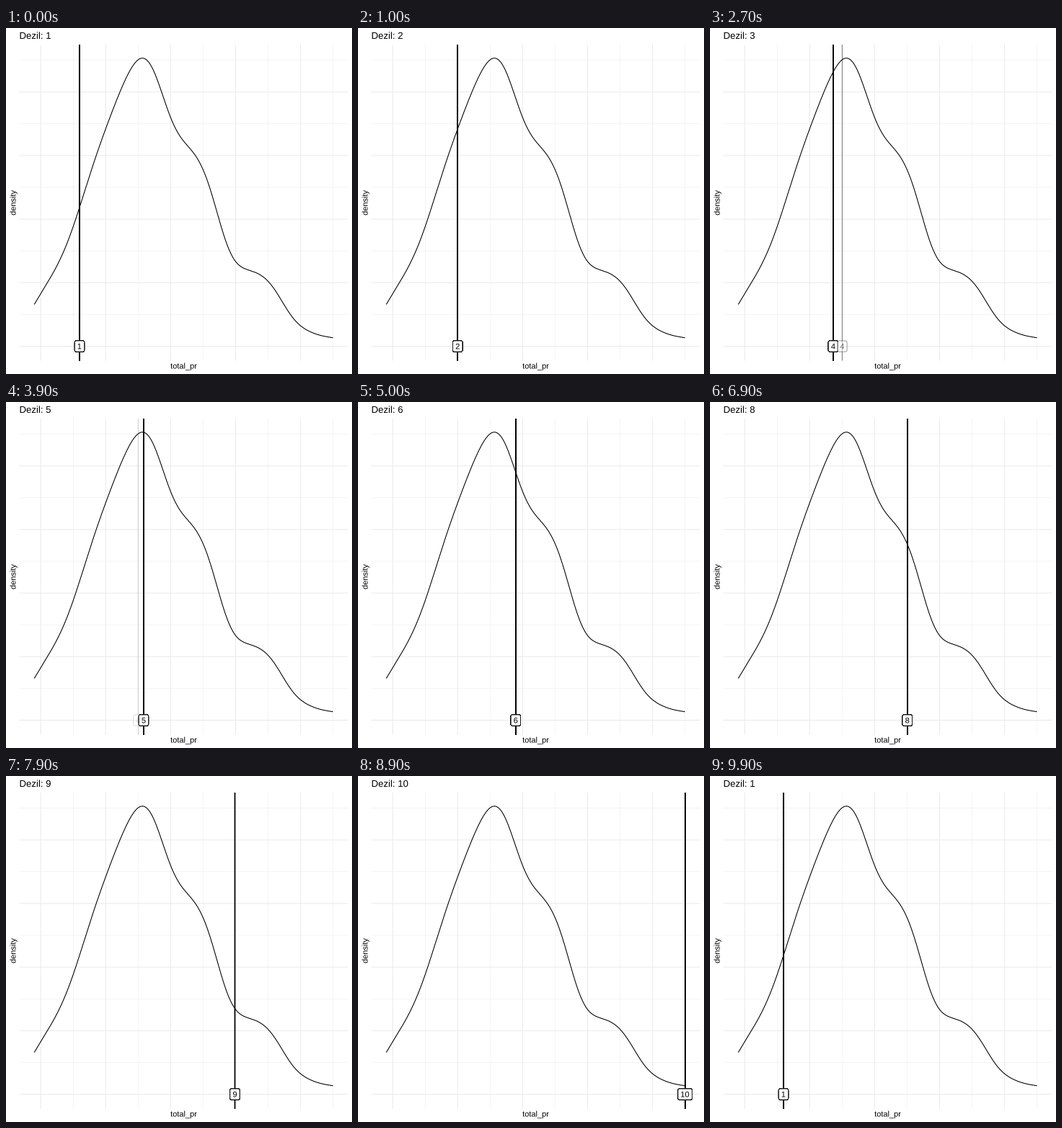
These frames come from a looping animation (480 px wide and 480 px high, 10000 ms). A matplotlib script:

```python
import numpy as np
import matplotlib.pyplot as plt
from matplotlib.animation import FuncAnimation
from matplotlib.patches import FancyBboxPatch, PathPatch
from matplotlib.textpath import TextPath
from matplotlib.transforms import Affine2D

plt.rcParams["font.family"] = "Liberation Sans"

SIZE, DPI = 480, 72  # at 72 dpi one point is one pixel
LEFT, RIGHT, TOP, BOTTOM = 18.5, 474.5, 23, 461.5
X_MIN, X_MAX, BASE_Y = 39.2, 453.7, 441.5
GRID = "#ebebeb"
THIN = 1.07
COPIES = 12  # coinciding observations drawn on top of each other
FRAMES, REST = 100, 4
BANDWIDTH = 24

# Marker position of each decile
DECILES = [102, 138.2, 158.4, 183.4, 192.5, 218.8, 246.5, 273.7, 317.5, X_MAX]
# Deciles that hold one more observation than the others
LARGER = range(0, 9, 3)
# Curve at evenly spaced x positions
CURVE = [383.5, 349.2, 308.5, 250.8, 186, 127.6, 76, 43.4, 59.8, 117.3, 157,
         184, 238.8, 305.5, 333, 341, 360.2, 393, 415.8, 425.5, 429.7]

# The loop ends on the first decile, so its rest began one frame earlier
arrive = np.round((FRAMES - 1) / 10 * np.arange(1, 11))
leave = np.roll(arrive, 1) + REST
leave[0] -= FRAMES


def kernels(x, centers):
    return np.exp(-((x[:, None] - centers) / BANDWIDTH) ** 2 / 2)


def density(x):
    """Sum of Gaussian kernels that passes through the curve points."""
    centers = np.linspace(X_MIN, X_MAX, len(CURVE))
    heights = BASE_Y - np.array(CURVE)
    weights = np.linalg.solve(kernels(centers, centers), heights)
    return BASE_Y - kernels(x, centers) @ weights


fig = plt.figure(figsize=(SIZE / DPI, SIZE / DPI), dpi=DPI, facecolor="white")
ax = fig.add_axes([0, 0, 1, 1])
ax.set_xlim(0, SIZE)
ax.set_ylim(SIZE, 0)
ax.axis("off")


def line(x, y, color="black", width=THIN, z=1):
    return ax.plot(x, y, color=color, lw=width, zorder=z, snap=False,
                   solid_capstyle="butt")[0]


def glyphs(text, size, x, y, centered=True, angle=0):
    """Outline of a text whose baseline starts, or is centred, at (x, y)."""
    path = TextPath((0, 0), text, size=size)
    box = path.get_extents()
    shift = -(box.x0 + box.x1) / 2 if centered else 0
    place = Affine2D().translate(shift, 0).scale(1, -1).rotate_deg(-angle)
    return path.transformed(place.translate(x, y))


def write(path):
    return ax.add_patch(PathPatch(path, fc="black", lw=0, zorder=4,
                                  snap=False))


def title_path(decile):
    return glyphs(f"Dezil: {decile + 1}", 13.2, LEFT, 15, centered=False)


def label_path(decile, x):
    return glyphs(str(decile + 1), 11.04, x, BASE_Y + 3.9)


for step in range(10):
    width = THIN / 2 if step % 2 else THIN
    gx, gy = 48.2 + 45.05 * step, BASE_Y - 44.1 * step
    line([gx, gx], [TOP, BOTTOM], GRID, width)
    line([LEFT, RIGHT], [gy, gy], GRID, width)

curve_x = np.linspace(X_MIN, X_MAX, 512)
line(curve_x, density(curve_x), z=2)

title = write(title_path(0))
write(glyphs("total_pr", 11, (LEFT + RIGHT) / 2, 472.5))
write(glyphs("density", 11, 13.4, (TOP + BOTTOM) / 2, angle=90))


class Marker:
    """A vertical line with a rounded label at its foot."""

    def __init__(self, copies):
        self.lines = [line([0, 0], [TOP, BOTTOM], z=3) for _ in range(copies)]
        self.boxes = [self.box() for _ in range(copies)]
        self.text = write(label_path(0, 0))

    def box(self):
        patch = FancyBboxPatch(
            (0, 0), 1, 1, boxstyle="round,pad=0,rounding_size=2.16",
            fc="white", ec="black", lw=0.8, zorder=4, snap=False)
        return ax.add_patch(patch)

    def place(self, x, decile, alpha=1):
        w, h = 6.14 * len(str(decile + 1)) + 7.2, 15.1
        for item in self.lines:
            item.set_xdata([x, x])
        for item in self.boxes:
            item.set_bounds(x - w / 2, BASE_Y - h / 2, w, h)
        self.text.set_path(label_path(decile, x))
        for item in [*self.lines, *self.boxes, self.text]:
            item.set_alpha(alpha)
            item.set_visible(alpha > 0)


marker = Marker(COPIES)
ghost = Marker(1)


def draw(frame):
    now = sum(frame >= arrive) % 10
    nxt = (now + 1) % 10
    t = (frame - leave[now]) / (arrive[now] - leave[now])
    if t < 0 or frame >= arrive[-1]:
        t = 0

    title.set_path(title_path(nxt if t > 0.5 else now))
    x = DECILES[now] + t * (DECILES[nxt] - DECILES[now])
    marker.place(x, nxt if t >= 0.5 else now)

    # The surplus observation has no partner, so it fades where it stands
    if t > 0 and nxt in LARGER:
        ghost.place(DECILES[nxt], nxt, t)
    elif t > 0 and now in LARGER:
        ghost.place(DECILES[now], now, 1 - t)
    else:
        ghost.place(0, 0, 0)


anim = FuncAnimation(fig, draw, frames=FRAMES, interval=100, repeat=True,
                     repeat_delay=0, init_func=lambda: draw(0))
plt.show()
```
